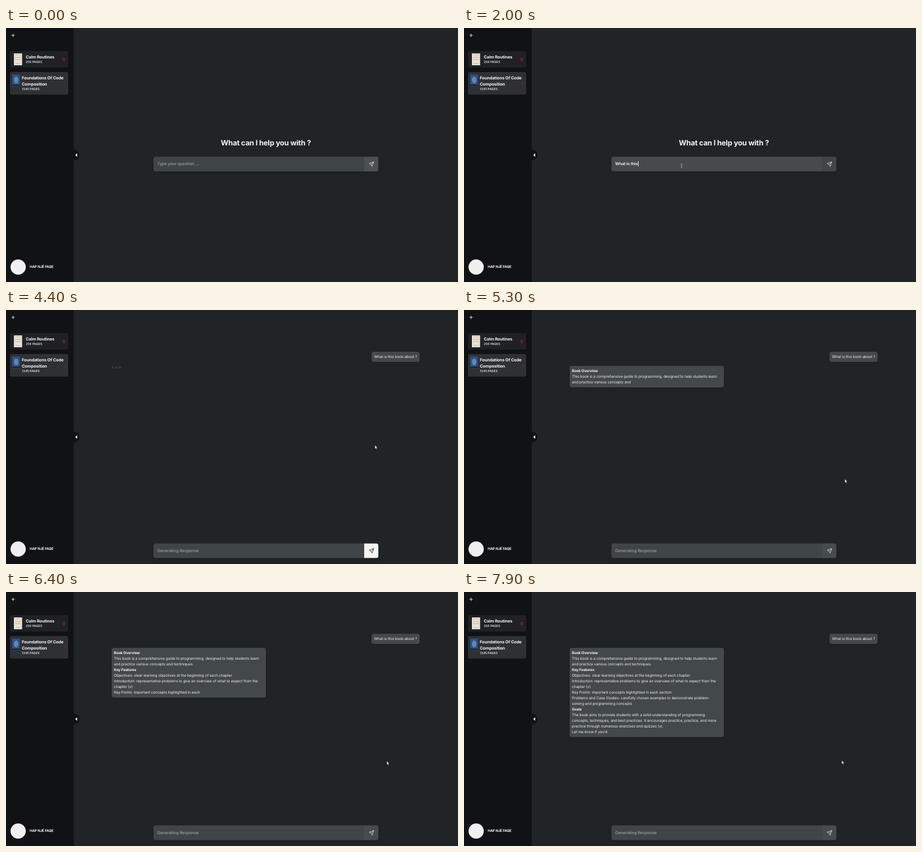
An HTML page for the animation above (8000 ms loop, 800x450 px).

```html
<!DOCTYPE html>
<html lang="en">
<head>
<meta charset="utf-8">
<title>Book chat</title>
<style>
  html, body { margin: 0; width: 100%; height: 100%; overflow: hidden; background: #212426; }
  #stage {
    position: relative; width: 800px; height: 450px; overflow: hidden;
    background: #212426; color: #f3f4f5;
    font: 400 6.5px/10px Inter, "Open Sans", sans-serif;
    letter-spacing: -.06px; text-rendering: geometricPrecision;
  }
  #stage div, #stage svg, #stage p { position: absolute; margin: 0; white-space: nowrap; }

  /* Sidebar */
  .side { left: 0; top: 0; width: 120px; height: 450px; background: #111215; }
  .tab { left: 110px; top: 215px; width: 20px; height: 20px; border-radius: 50%; background: #111215; }
  .card { left: 6.5px; width: 103.5px; border-radius: 3px; }
  .card.one { top: 41px; height: 29px; background: #1f2124; }
  .card.two { top: 78.2px; height: 39.4px; background: #2e3034; }
  .title { font-size: 7.4px; line-height: 11px; font-weight: 700; letter-spacing: -.12px; }
  .pages { font-size: 5.5px; font-weight: 500; letter-spacing: -.05px; }
  .logo { left: 8px; top: 410px; width: 27px; height: 27px; border-radius: 50%; background: #f1efef; }
  .brand { left: 42px; top: 418.5px; font-size: 6.2px; font-weight: 700; letter-spacing: -.2px; }

  /* Main area */
  .heading {
    left: 260px; width: 400px; top: 194.4px; line-height: 20px; text-align: center;
    font-size: 13px; font-weight: 700; letter-spacing: -.23px;
    animation: leave 8s step-end infinite;
  }
  .bar, .bubble { border-radius: 4px; box-shadow: 0 4px 6px -1px rgba(0, 0, 0, .1); }
  .bar {
    left: 261px; top: 228px; width: 398px; height: 26px; overflow: hidden;
    background: #3f4447;
    font-size: 7.4px; font-weight: 500; letter-spacing: -.12px;
    animation: drop 8s step-end infinite, focus 8s linear infinite;
  }
  .hint { left: 6.5px; top: 8.2px; color: #999fa3; }
  .typed { left: 6.5px; top: 8.2px; font-weight: 600; letter-spacing: -.15px; white-space: pre !important; }
  .caret { display: inline-block; width: .6px; height: 9px; margin-left: .3px; vertical-align: -2px; background: #f3f4f5; }
  .send { right: 0; top: 0; width: 25px; height: 26px; background: #4b5053; color: #e6e8e9; animation: send 8s linear infinite; }

  .bubble { background: #43484b; }
  .ask { left: 647px; top: 73.5px; width: 85px; height: 18px; line-height: 18px; text-align: center; }
  .reply { left: 186.5px; top: 98.5px; padding: 4px 4.5px; box-sizing: border-box; }
  .reply span { display: block; min-height: 10px; }
  .reply b { letter-spacing: -.16px; }
  .chat { animation: enter 8s step-end infinite; }
  .dots { left: 186.5px; top: 100px; animation: wait 8s step-end infinite; }
  .dots svg { fill: #70767a; animation: pulse .8s ease-in-out infinite; }

  /* Pointer */
  .pointer { left: 0; top: 0; animation: travel 8s ease-in-out infinite; }
  .pointer svg { left: 0; top: 0; overflow: visible; }
  .beam { animation: beam 8s step-end infinite; }
  .arrow { animation: arrow 8s step-end infinite; }

  @keyframes leave { 0% { opacity: 1 } 52.4%, 100% { opacity: 0 } }
  @keyframes enter { 0% { opacity: 0 } 52.4%, 100% { opacity: 1 } }
  @keyframes wait { 0% { opacity: 0 } 52.4% { opacity: 1 } 58.6%, 100% { opacity: 0 } }
  @keyframes drop { 0% { transform: none } 52.4%, 100% { transform: translateY(185.5px) } }
  @keyframes focus {
    0%, 1.2% { background-color: #3f4447 }
    5%, 52.3% { background-color: #464a4c }
    52.4%, 100% { background-color: #404548 }
  }
  @keyframes send {
    0%, 1.2% { background-color: #4b5053; color: #e6e8e9 }
    5%, 51.4% { background-color: #414548; color: #e6e8e9 }
    52.4%, 55.5% { background-color: #f5f5f2; color: #25282a }
    58.5%, 100% { background-color: #464b4e; color: #e6e8e9 }
  }
  @keyframes pulse { 0%, 100% { opacity: .7 } 50% { opacity: .28 } }
  @keyframes travel {
    0%, 48% { transform: translate(385px, 244px) }
    52% { transform: translate(646px, 241px) }
    55%, 56.5% { transform: translate(653px, 239.5px) }
    65%, 93% { transform: translate(674px, 299.5px) }
    98.6%, 100% { transform: translate(668.5px, 298.3px) }
  }
  @keyframes beam { 0% { opacity: 0 } 2.4% { opacity: 1 } 51.5%, 100% { opacity: 0 } }
  @keyframes arrow { 0% { opacity: 0 } 51.5%, 100% { opacity: 1 } }
</style>
</head>
<body>
<div id="stage">
  <div class="tab"></div>
  <div class="side"></div>
  <div class="card one"></div>
  <div class="card two"></div>
  <svg width="130" height="240" fill="none">
    <path d="M12.5 10v6M9.5 13h6" stroke="#eee" stroke-width=".9"/>
    <path d="M126 221.900v6.400l-3.500-3.200z" fill="#fff"/>
    <path d="M14 45h14.500v21h-14.500z" fill="#e9e4d9"/>
    <path d="M15.500 47.500h11.500M17 63h8.500" stroke="#b5b4ac"/>
    <path d="M16 52h10.500M16 56h10.500" stroke="#d9c6a6" stroke-width="1.800"/>
    <path d="M11 82.500h13.500v21h-13.500z" fill="#2f5186"/>
    <ellipse cx="18" cy="92" rx="4" ry="6" fill="#6285b4"/>
    <path d="M11 101.500h13.500" stroke="#1b2940" stroke-width="3"/>
    <g id="bin" stroke="#a81d2d" stroke-width=".9">
      <path d="M99.800 54.300h5M100.500 54.300l.4 4.300h2.900l.5-4.300M101.400 53.300h1.900M102.300 55.800v1.600"/>
    </g>
    <use href="#bin" x="1.500" y="42.500" opacity=".3"/>
  </svg>
  <p class="title" style="left:35px;top:46.3px">Calm Routines</p>
  <p class="pages" style="left:35px;top:56px">256 PAGES</p>
  <p class="title" style="left:28px;top:83px">Foundations Of Code<br>Composition</p>
  <p class="pages" style="left:28px;top:104px">1345 PAGES</p>
  <div class="logo"></div>
  <p class="brand">HAP NJË FAQE</p>

  <p class="heading">What can I help you with ?</p>
  <div class="bar">
    <p class="hint"></p>
    <p class="typed"><span></span><i class="caret"></i></p>
    <div class="send">
      <svg width="25" height="26" fill="none" stroke="currentColor" stroke-width=".8" stroke-linejoin="round">
        <path d="M17 9l-8.200 3.100 3.500 1.800 1.700 3.500zM17 9l-4.700 4.900"/>
      </svg>
    </div>
  </div>

  <div class="chat">
    <div class="bubble ask">What is this book about ?</div>
  </div>
  <div class="dots">
    <svg width="20" height="5"><circle cx="2.200" cy="2" r="2"/><circle cx="8.500" cy="2" r="2"/><circle cx="14.700" cy="2" r="2"/></svg>
  </div>
  <div class="bubble reply"></div>

  <div class="pointer">
    <svg class="beam" width="1" height="1" fill="none" stroke="#a4a8aa" stroke-width=".7">
      <path d="M-1.500-3.500q1.500 0 1.500 1v5q0 1-1.500 1M1.500-3.500q-1.500 0-1.500 1v5q0 1 1.500 1"/>
    </svg>
    <svg class="arrow" width="1" height="1">
      <path d="M0 0v6.600l1.500-1.400 1.100 2.400 1.100-.5-1.100-2.300h2z" fill="#fff" stroke="#111" stroke-width=".5"/>
    </svg>
  </div>
</div>

<script>
  const LOOP = 8000, FOCUS = 400, SENT = 4190, LEAD = 15;
  const question = "What is this book about ?";
  // When each letter of the question is typed
  const keys = [900, 1200, 1300, 1350, 1400, 1600, 1700, 1800, 1850, 1900, 1950, 2000, 2100,
    2300, 2400, 2500, 2600, 2700, 2800, 3000, 3100, 3200, 3300, 3350, 3400];
  // Reply progress: [time, words shown]
  const pace = [[4690, 1], [5300, 20.4], [6400, 55.4], [7000, 75.5], [7900, 106.4], [8000, 109]];
  const reply = [
    "# Book Overview",
    "This book is a comprehensive guide to programming, designed to help students learn",
    "and practice various concepts and techniques.",
    "# Key Features",
    "Objectives: clear learning objectives at the beginning of each chapter",
    "Introduction: representative problems to give an overview of what to expect from the",
    "chapter (v)",
    "Key Points: important concepts highlighted in each section",
    "Problems and Case Studies: carefully chosen examples to demonstrate problem-",
    "solving and programming concepts",
    "# Goals",
    "The book aims to provide students with a solid understanding of programming",
    "concepts, techniques, and best practices. It encourages practice, practice, and more",
    "practice through numerous exercises and quizzes (v).",
    "Let me know if you'd like more"
  ].map(line => ({ bold: line.startsWith("#"), words: line.replace("# ", "").split(" ") }));

  const $ = s => document.querySelector(s);
  const hint = $(".hint"), typed = $(".typed"), letters = $(".typed span"), bubble = $(".reply");

  function wordsAt(t) {
    if (t < pace[0][0]) return 0;
    const i = pace.findIndex(p => t < p[0]);
    const [t0, w0] = pace[i - 1], [t1, w1] = pace[i];
    return Math.floor(w0 + (w1 - w0) * (t - t0) / (t1 - t0));
  }

  let shown = -1;
  function showReply(count) {
    if (count === shown) return;
    shown = count;
    let left = count, rows = 0, html = "";
    for (const { bold, words } of reply) {
      if (left <= 0) break;
      const text = words.slice(0, left).join(" ");
      html += `<span>${bold ? `<b>${text}</b>` : text}</span>`;
      left -= words.length;
      rows++;
    }
    bubble.innerHTML = html;
    bubble.style.visibility = count ? "visible" : "hidden";
    bubble.style.width = rows > 2 ? "273px" : "max-content";
  }

  function render(t) {
    const count = keys.filter(k => t >= k - LEAD).length;
    const sent = t >= SENT;
    letters.textContent = question.slice(0, count);
    typed.style.visibility = t >= FOCUS && !sent ? "visible" : "hidden";
    hint.textContent = sent ? "Generating Response" : count ? "" : "Type your question ...";
    showReply(wordsAt(t));
  }

  let start;
  function tick(now) {
    start ??= now;
    render((now - start) % LOOP);
    requestAnimationFrame(tick);
  }
  render(0);
  requestAnimationFrame(tick);
</script>
</body>
</html>
```
